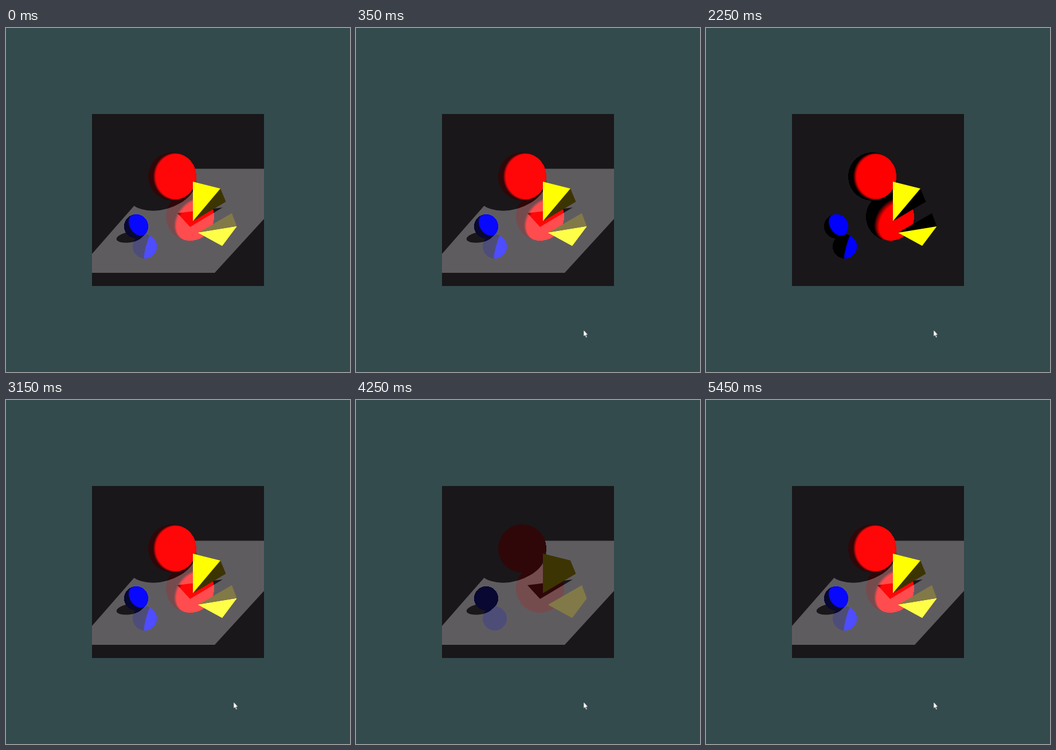
Write an HTML page with a canvas that moves like this. It is 600x600 px and loops after 8 s.

```html
<!DOCTYPE html>
<html lang="en">
<head>
<meta charset="utf-8">
<title>Ray traced shapes</title>
<style>
  html, body { margin: 0; width: 100%; height: 100%; overflow: hidden; background: #334b4d; }
  canvas { position: absolute; left: 150px; top: 150px; width: 300px; height: 300px; }
  #direct { animation: direct 8s step-end infinite; }
  #ambient { animation: ambient 8s step-end infinite; }
  #pointer {
    position: absolute; left: 0; top: 0; width: 12px; height: 18px;
    overflow: visible; animation: pointer 8s infinite;
  }
  @keyframes direct {
    0%, 39.375%, 100% { opacity: 0; }
    25.625% { opacity: 1; }
  }
  @keyframes ambient {
    0%, 65.625%, 100% { opacity: 0; }
    51.25% { opacity: 1; }
  }
  @keyframes pointer {
    0% { opacity: 0; transform: translate(107px, 588px); animation-timing-function: step-end; }
    1.875% { opacity: 1; transform: translate(107px, 588px); animation-timing-function: steps(4, end); }
    4.375%, 100% { opacity: 1; transform: translate(396.5px, 526px); }
  }
</style>
</head>
<body>
<canvas id="full" width="300" height="300"></canvas>
<canvas id="direct" width="300" height="300"></canvas>
<canvas id="ambient" width="300" height="300"></canvas>
<svg id="pointer" viewBox="0 0 12 18">
  <path d="M.4 .4V12.2L3 9.9L4.8 14.3L6.7 13.5L4.9 9.2H8.2Z" fill="#fff" stroke="#1c2828" stroke-width=".6"/>
</svg>
<script>
  const BACK = '#19171a';
  const RED = { lit: [255, 0, 0], amb: [47, 7, 8] };
  const BLUE = { lit: [0, 0, 255], amb: [8, 8, 50] };
  const YELLOW = { lit: [255, 255, 0], amb: [60, 52, 2] };

  // Colour of a surface that receives the given share of direct light
  function shade(mat, light, mode) {
    const parts = mat.lit.map((v, i) =>
      Math.min(255, Math.round(v * light * mode.direct + mat.amb[i] * mode.ambient)));
    return `rgb(${parts})`;
  }

  function poly(ctx, points, fill) {
    ctx.beginPath();
    points.forEach(([x, y]) => ctx.lineTo(x, y));
    ctx.fillStyle = fill;
    ctx.fill();
  }

  function ellipse(ctx, x, y, rx, ry, tilt) {
    ctx.beginPath();
    ctx.ellipse(x, y, rx, ry, tilt, 0, 2 * Math.PI);
    ctx.fill();
  }

  // A near light [lx, ly, z towards the viewer] reaches only the cap above the edge value
  function sphere(ctx, mode, mat, cx, cy, r, [lx, ly, lz], edge, gain) {
    for (let y = cy - r; y < cy + r; y++) {
      for (let x = cx - r; x < cx + r; x++) {
        const nx = (x + .5 - cx) / r, ny = (y + .5 - cy) / r;
        const d = nx * nx + ny * ny;
        if (d > 1) continue;
        const dot = nx * lx + ny * ly + Math.sqrt(1 - d) * lz;
        const light = Math.min(1, Math.max(0, (dot - edge) * gain));
        ctx.fillStyle = shade(mat, light, mode);
        ctx.fillRect(x, y, 1, 1);
      }
    }
  }

  // Two visible faces meet along the edge from tip to b
  function pyramid(ctx, mode, tip, a, b, c) {
    poly(ctx, [tip, a, b, c], shade(YELLOW, 0, mode));
    poly(ctx, [tip, a, b], shade(YELLOW, 1, mode));
  }

  function makeFloor() {
    const layer = document.createElement('canvas');
    layer.width = layer.height = 300;
    const ctx = layer.getContext('2d');
    ctx.translate(-150, -150);
    poly(ctx, [[280, 245.5], [530, 245.5], [364, 427], [121, 427]], 'rgb(70,69,70)');
    // Shadows
    ctx.globalCompositeOperation = 'destination-out';
    ellipse(ctx, 271, 277.5, 62, 39, -.28);
    ellipse(ctx, 215.5, 365, 23, 9, -.15);
    poly(ctx, [[299, 323], [378, 313], [321, 347]], '#000');
    return layer;
  }

  function render(id, mode) {
    const ctx = document.getElementById(id).getContext('2d');
    ctx.fillStyle = BACK;
    ctx.fillRect(0, 0, 300, 300);
    ctx.translate(-150, -150);

    // Mirrored shapes
    sphere(ctx, mode, RED, 321, 329, 42, [.55, .4, .73], .25, 4);
    sphere(ctx, mode, BLUE, 242, 381, 21, [.97, .25, .1], .18, 12);
    pyramid(ctx, mode, [335, 357], [377, 380], [402.5, 346], [394, 323]);

    if (mode.floor) {
      ctx.globalCompositeOperation = 'lighter';
      ctx.drawImage(mode.floor, 150, 150);
      ctx.globalCompositeOperation = 'source-over';
    }

    sphere(ctx, mode, RED, 290, 259, 42, [.42, 0, .91], .22, 5);
    sphere(ctx, mode, BLUE, 227, 346, 21, [.6, -.4, .69], .22, 12);
    pyramid(ctx, mode, [326, 337], [326, 268], [374, 280], [383.5, 303]);
  }

  const floor = makeFloor();
  render('full', { direct: 1, ambient: 1, floor });
  render('direct', { direct: 1, ambient: 0 });
  render('ambient', { direct: 0, ambient: 1, floor });
</script>
</body>
</html>
```
